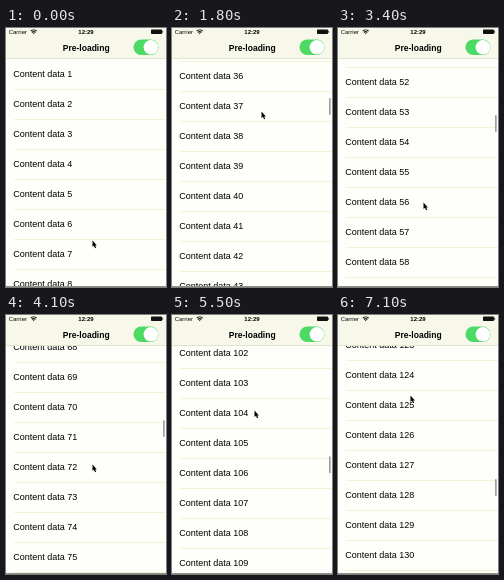
Recreate the animation shown at these times as an HTML page with a canvas. Size 160 by 259 pixels, loop 7200 ms.

```html
<!DOCTYPE html>
<html lang="en">
<head>
<meta charset="utf-8">
<title>Pre-loading</title>
<style>
html, body { margin: 0; width: 100%; height: 100%; overflow: hidden; background: #fefefb; }
canvas { display: block; width: 160px; height: 259px; }
</style>
</head>
<body>
<canvas id="stage" width="160" height="259"></canvas>
<script>
const ctx = document.getElementById('stage').getContext('2d');
const LOOP = 7200, STEP = 100, ROW = 30, HEADER = 31;
const FONT = '"Liberation Sans", Arial, sans-serif';

// time, scroll offset, pointer x, pointer y
const keys = [
  [0, 0, 86, 212],
  [900, 682, 103, 137],
  [1800, 1048, 89, 83],
  [3400, 1522, 85, 174],
  [4800, 2586, 86, 110],
  [6100, 3363, 78, 87],
  [7100, 3676, 72, 80]
];

function slope(i, col) {
  const a = keys[Math.max(0, i - 1)], b = keys[Math.min(keys.length - 1, i + 1)];
  return i === 0 ? 0 : (b[col] - a[col]) / (b[0] - a[0]);
}

// Cubic Hermite curve through the keys
function valueAt(time, col) {
  let i = 0;
  while (i < keys.length - 2 && time >= keys[i + 1][0]) i++;
  const a = keys[i], b = keys[i + 1], span = b[0] - a[0];
  const u = (time - a[0]) / span, v = 1 - u;
  return a[col] * (1 + 2 * u) * v * v + b[col] * u * u * (3 - 2 * u)
    + span * u * v * (slope(i, col) * v - slope(i + 1, col) * u);
}

function box(x, y, w, h, color, radius = 0) {
  ctx.fillStyle = color;
  ctx.beginPath();
  ctx.roundRect(x, y, w, h, radius);
  ctx.fill();
}

function label(text, x, y, font, align = 'left') {
  ctx.fillStyle = '#000';
  ctx.font = `${font} ${FONT}`;
  ctx.textAlign = align;
  ctx.fillText(text, x, y);
}

function drawRows(scroll, time) {
  const first = Math.max(1, Math.floor(scroll / ROW));
  const fade = Math.min(1, Math.max(0, (time - 740) / 400));
  for (let n = first; n < first + 11; n++) {
    const y = HEADER + (n - 1) * ROW - scroll;
    ctx.globalAlpha = n > 20 && n < 28 ? fade : 1;
    label('Content data ' + n, 7.2, y + 17.5, '9px');
    ctx.globalAlpha = 1;
    box(8, y + ROW, 152, 1, '#f3f2d2');
  }
}

function drawWifi(x, y) {
  ctx.strokeStyle = '#111';
  ctx.lineWidth = 1.1;
  for (const r of [0.6, 2.4, 4.2]) {
    ctx.beginPath();
    ctx.arc(x, y, r, -Math.PI * 0.75, -Math.PI * 0.25);
    ctx.stroke();
  }
}

function drawHeader() {
  box(0, 0, 160, HEADER, '#f8f8ea');
  box(0, HEADER - 0.5, 160, 0.5, '#d0cfbc');
  label('Carrier', 2.7, 6, '6px');
  drawWifi(27.7, 6.2);
  label('12:29', 80, 6, 'bold 6px', 'center');
  box(145, 1.5, 11, 4.5, '#111', 0.7);
  box(156.3, 2.8, 0.8, 2, '#111');
  label('Pre-loading', 80.2, 23, 'bold 8.5px', 'center');
  box(127.5, 11.5, 25, 15.5, '#4cd964', 7.75);
  box(137.6, 12, 14.6, 14.6, '#fff', 7.3);
}

function drawPointer(x, y) {
  const arrow = new Path2D('M0.5 0.5V7L1.9 5.8L3.1 8.2L4.2 7.7L3.1 5.4H4.9Z');
  ctx.save();
  ctx.translate(x, y);
  ctx.strokeStyle = '#fff';
  ctx.lineWidth = 1;
  ctx.stroke(arrow);
  ctx.fillStyle = '#000';
  ctx.fill(arrow);
  ctx.restore();
}

function draw(now) {
  const time = Math.floor((now % LOOP) / STEP) * STEP;
  const [scroll, x, y] = [1, 2, 3].map(col => Math.round(valueAt(time, col)));
  box(0, 0, 160, 259, '#fefefb');
  drawRows(scroll, time);
  if (scroll > 0) box(157, 32.5 + scroll * 0.0358, 1.7, 17, '#a0a09c', 0.8);
  drawHeader();
  box(0, 258, 160, 1, '#8f8f86');
  drawPointer(x, y);
  requestAnimationFrame(draw);
}
requestAnimationFrame(draw);
</script>
</body>
</html>
```
